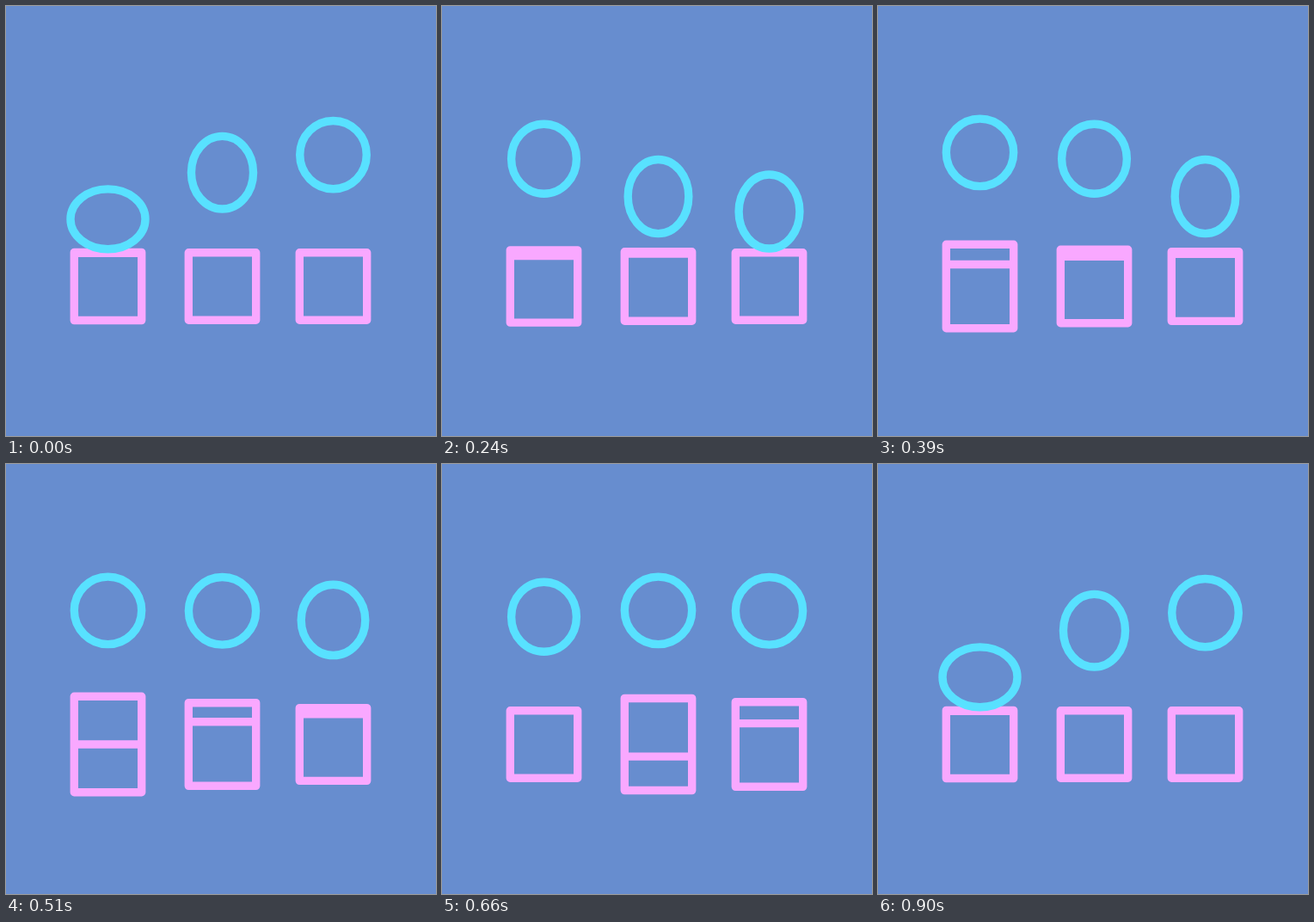
An HTML page with a canvas that plays this animation: 500x500 px, repeating every 0.93 s.

```html
<!DOCTYPE html>
<html lang="en">
<head>
<meta charset="utf-8">
<title>Bouncing loader</title>
<style>
html, body { margin: 0; width: 100%; height: 100%; overflow: hidden; background: #678dcf; }
canvas { display: block; width: 500px; height: 500px; }
</style>
</head>
<body>
<canvas id="stage" width="500" height="500"></canvas>
<script>
const ctx = document.getElementById('stage').getContext('2d');
const STEP = 30, STEPS = 31, CYCLE = 30; // ms per step, steps shown, steps per bounce
const HALF = 39.2;                       // ball radius and half the box side
const COLUMNS = [
  { x: 118.5, ballDelay: 0, boxDelay: 0 },
  { x: 251.5, ballDelay: 5, boxDelay: 4.2 },
  { x: 380.5, ballDelay: 10, boxDelay: 8.7 },
];

const wrap = p => ((p % CYCLE) + CYCLE) % CYCLE;

// Bezier easing with level ends; x1 and x2 place the handles in time.
function ease(x, x1, x2) {
  let low = 0, high = 1, s = 0.5;
  for (let i = 0; i < 24; i++) {
    const r = 1 - s;
    if (3 * r * r * s * x1 + 3 * r * s * s * x2 + s ** 3 < x) low = s;
    else high = s;
    s = (low + high) / 2;
  }
  return s * s * (3 - 2 * s);
}

// The bar creeps off the top edge, speeds up to the middle, then brakes to the bottom.
function barSlide(p) {
  if (p < 17) return 0.5 * 2 ** (0.38 * (p - 17));
  const rest = Math.max(0, 1 - (p - 17) / 4);
  return 1 - 0.5 * rest * rest;
}

function drawBox(x, p) {
  const slide = barSlide(p), y = 326;
  const grow = 66 * slide * (1 - slide);
  const barY = y + HALF * (2 * slide - 1);
  ctx.strokeStyle = '#f9a8ff';
  ctx.beginPath();
  ctx.rect(x - HALF, y - HALF - grow, HALF * 2, (HALF + grow) * 2);
  ctx.moveTo(x - HALF, barY);
  ctx.lineTo(x + HALF, barY);
  ctx.stroke();
}

// Rise and fall mirror each other around the top; the ball is squashed at the bottom.
function drawBall(x, p) {
  const q = Math.min(p, CYCLE - p);
  const y = 247.8 - 77.6 * ease(Math.min(q / 14, 1), 0.33, 0.04);
  const stretch = 4.2 * Math.exp(-((q / 7.6) ** 3)) - 8.5 * Math.exp(-1.6 * q);
  ctx.strokeStyle = '#58e1ff';
  ctx.beginPath();
  ctx.ellipse(x, y, HALF - stretch, HALF + stretch, 0, 0, Math.PI * 2);
  ctx.stroke();
}

function draw(time) {
  const step = Math.floor(time / STEP) % STEPS;
  ctx.fillStyle = '#678dcf';
  ctx.fillRect(0, 0, 500, 500);
  ctx.lineWidth = 9.4;
  ctx.lineJoin = 'round';
  for (const { x, ballDelay, boxDelay } of COLUMNS) {
    drawBox(x, wrap(step - boxDelay));
    drawBall(x, wrap(step - ballDelay));
  }
}

const start = performance.now();
function tick() {
  draw(performance.now() - start);
  requestAnimationFrame(tick);
}
tick();
</script>
</body>
</html>
```
